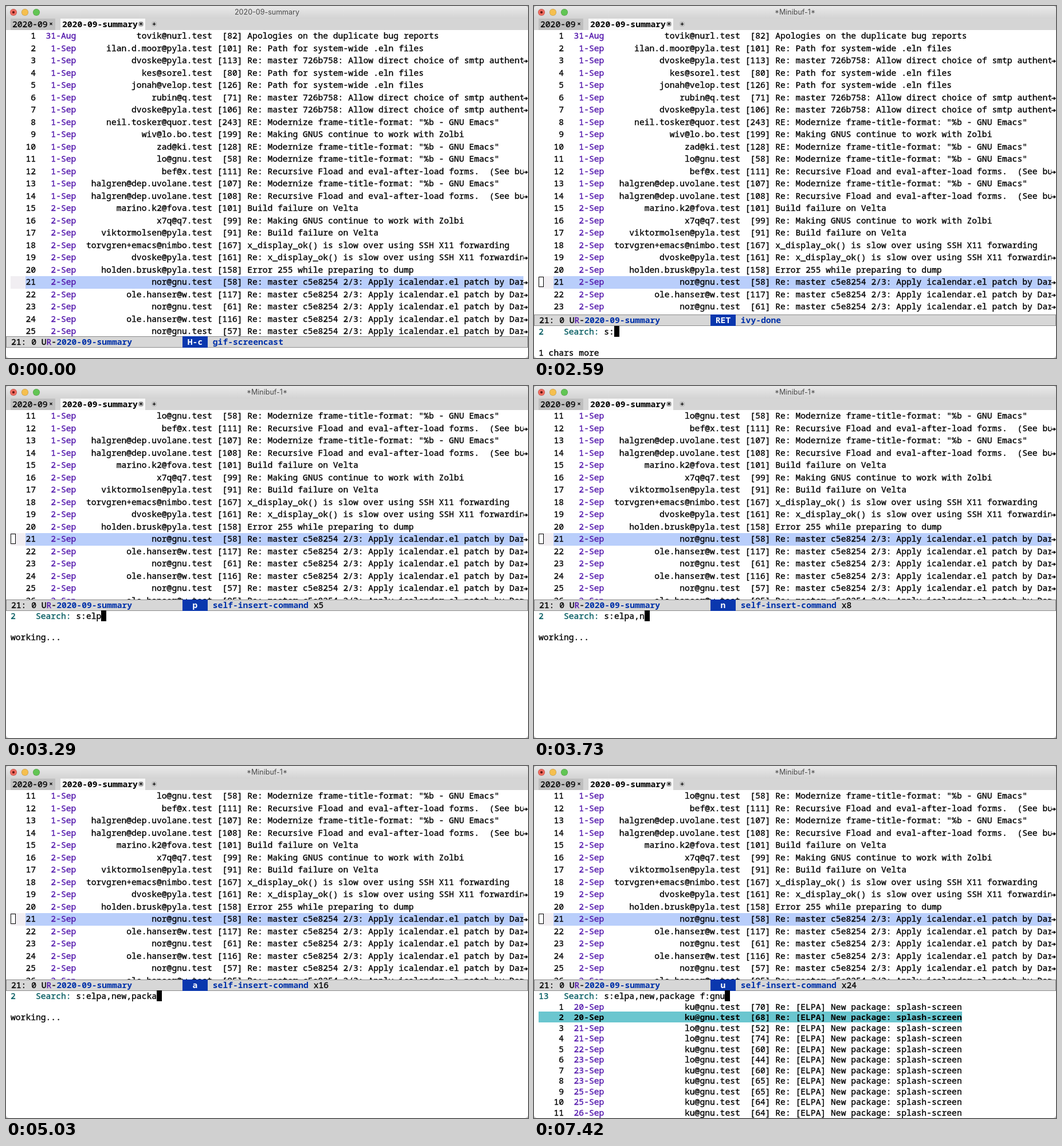
Recreate the animation shown at these times as an HTML page. Size 911 by 615 pixels, loop 8000 ms.

```html
<!DOCTYPE html>
<html lang="en">
<head>
<meta charset="utf-8">
<title>Mail search</title>
<style>
html, body { margin: 0; width: 100%; height: 100%; overflow: hidden; background: #bbb; }
#win { position: relative; width: 911px; height: 615px; overflow: hidden; background: #fff; border-radius: 5px;
  font: 500 14.667px "Noto Sans Mono", "DejaVu Sans Mono", monospace; color: #000; font-variant-ligatures: none;
  -webkit-text-stroke: .35px; }
#win div, #win svg { position: absolute; white-space: pre; box-sizing: border-box; }
#win b, #title, .icon, #win .pick { -webkit-text-stroke: 0; }
#win b { font-weight: 700; }
#bar { left: 0; top: 0; width: 911px; height: 22px; background: linear-gradient(#e9e9e9, #d3d3d3); }
#title { left: 0; top: 0; width: 911px; text-align: center; color: #4a4a4a; font: 400 12.5px/22px Inter, sans-serif; }
.light { top: 5px; width: 12px; height: 12px; border-radius: 50%; box-shadow: inset 0 0 0 .5px #0004; }
#tabs { left: 0; top: 22px; width: 911px; height: 20px; background: #d5d5d5; }
.tab { top: 0; height: 20px; padding-left: 3px; line-height: 19px; }
.icon { width: 9px; height: 9px; border-radius: 4px; font-size: 11px; line-height: 8px; text-align: center; font-weight: 700; }
#list { left: 0; top: 42px; width: 911px; overflow: hidden; }
.row { left: 8px; line-height: 19px; }
.mini { left: 8px; line-height: 18.5px; }
.fringe { left: 903px; width: 8px; height: 18px; background: #fff; }
.date { color: #5317ac; }
.pick { background: #6ac6cf; font-weight: 700; }
.pick .date { color: #000; }
#mode { left: 0; width: 911px; height: 20px; border: 1px solid #8c8c8c; background: #d7d7d7; padding-left: 8px; line-height: 17px; }
#mode b { color: #0031a9; }
#mode .key { position: relative; color: #fff; }
#keybox { left: 307.2px; top: -1px; width: 44px; height: 20px; background: #0a37ae; }
.prompt { color: #005a5f; }
.caret { display: inline-block; width: 9px; height: 18.5px; background: #000; vertical-align: top; }
</style>
</head>
<body>
<div id="win">
  <div id="bar">
    <div class="light" style="left:7px;background:#ed6a5f"></div>
    <div class="light" style="left:11px;top:9px;width:4px;height:4px;background:#6b1410"></div>
    <div class="light" style="left:27px;background:#f5bf4f"></div>
    <div class="light" style="left:47px;background:#62c554"></div>
    <div id="title"></div>
  </div>
  <div id="tabs">
    <div class="tab" style="left:8px;width:78px;background:#bfbfbf">2020-09</div>
    <div class="icon" style="left:74px;top:5px">×</div>
    <div class="tab" style="left:95px;width:148px;background:#f8f8f8"><b>2020-09-summary</b></div>
    <div class="icon" style="left:231px;top:5px;background:#b0b0b0">×</div>
    <div class="icon" style="left:254px;top:5px;background:#bdbdbd">+</div>
  </div>
  <div id="list"></div>
  <div id="mode"></div>
  <div id="mini"></div>
</div>
<script>
const PITCH = 21.5, MINI = 18.5, LOOP = 8000, WIDTH = 55;
const $ = id => document.getElementById(id);

const path = "Re: Path for system-wide .eln files";
const smtp = "Re: master 726b758: Allow direct choice of smtp authentication";
const frame = 'Modernize frame-title-format: "%b - GNU Emacs"';
const gnus = "Re: Making GNUS continue to work with Zolbi";
const fload = "Re: Recursive Fload and eval-after-load forms.  (See bug)";
const build = "Build failure on Velta";
const slow = "x_display_ok() is slow over using SSH X11 forwarding";
const patch = "Re: master c5e8254 2/3: Apply icalendar.el patch by Darvin";

const mails = [
  ["tovik@nurl.test", 82, "Apologies on the duplicate bug reports"],
  ["ilan.d.moor@pyla.test", 101, path],
  ["dvoske@pyla.test", 113, smtp],
  ["kes@sorel.test", 80, path],
  ["jonah@velop.test", 126, path],
  ["rubin@q.test", 71, smtp],
  ["dvoske@pyla.test", 106, smtp],
  ["neil.tosker@quor.test", 243, "RE: " + frame],
  ["wiv@lo.bo.test", 199, gnus],
  ["zad@ki.test", 128, "RE: " + frame],
  ["lo@gnu.test", 58, "Re: " + frame],
  ["bef@x.test", 111, fload],
  ["halgren@dep.uvolane.test", 107, "Re: " + frame],
  ["halgren@dep.uvolane.test", 108, fload],
  ["marino.k2@fova.test", 101, build],
  ["x7q@q7.test", 99, gnus],
  ["viktormolsen@pyla.test", 91, "Re: " + build],
  ["torvgren+emacs@nimbo.test", 167, slow],
  ["dvoske@pyla.test", 161, "Re: " + slow],
  ["holden.brusk@pyla.test", 158, "Error 255 while preparing to dump"],
  ["nor@gnu.test", 58, patch],
  ["ole.hanser@w.test", 117, patch],
  ["nor@gnu.test", 61, patch],
  ["ole.hanser@w.test", 116, patch],
  ["nor@gnu.test", 57, patch],
  ["ole.hanser@w.test", 95, patch]
].map((m, i) => [i < 1 ? "31-Aug" : i < 14 ? "1-Sep" : "2-Sep", ...m]);

const proposal = "[ELPA] New package proposal: org-translate";
const jens = [["16-Sep", 119, ""], ["19-Sep", 99, "Re: "], ["19-Sep", 100, "Re: "]]
  .map(([date, size, re]) => [date, "jens@jensholmqvard.test", size, re + proposal]);
const gnu = [[20, "ku", 70], [20, "ku", 68], [21, "lo", 52], [21, "lo", 74], [22, "ku", 60], [23, "lo", 44],
  [23, "ku", 60], [23, "ku", 65], [25, "ku", 65], [25, "ku", 64], [26, "ku", 64]]
  .map(([day, who, size]) => [day + "-Sep", who + "@gnu.test", size, "Re: [ELPA] New package: splash-screen"]);
const both = [...jens, ...gnu];
const early = ["7-Sep", "8-Sep"].map((date, i) =>
  [date, "nor@gnu.test", 64 + 9 * i, "Re: master 726b758: Allow direct choice of ELPA archives"]);

// Search results by number of typed characters: rows, total, selected row
const found = { 6: [[...early, ...both], 73, 0], 10: [both, 31, 0], 18: [both, 25, 0], 20: [jens, 3, 0], 24: [gnu, 13, 1] };
found[7] = found[6];
found[11] = found[10];
found[19] = found[18];

const query = "s:elpa,new,package f:gnu";
// Time and number of typed characters; -1 is before the search opens
const steps = [[0, -1], [1000, 0], [1730, 1], [2590, 2], [2980, 3], [3110, 4], [3290, 5], [3420, 6], [3570, 7],
  [3730, 8], [3860, 10], [4180, 11], [4460, 12], [4590, 13], [4710, 15], [5030, 16], [5260, 18], [5470, 19],
  [6100, 20], [6390, 21], [7150, 22], [7280, 23], [7420, 24]];

const line = (cls, y, html) => `<div class="${cls}" style="top:${y}px">${html}</div>`;
const box = (x, y, w, h, css) => `<div style="left:${x}px;top:${y}px;width:${w}px;height:${h}px;${css}"></div>`;
const arrow = `<svg width="8" height="18"><path d="M0 10.5H5" stroke="#000" stroke-width="1.4"/><path d="M4 7.5L8 10.5 4 13.5z"/></svg>`;

function mailRow(cls, y, [date, from, size, subject], number) {
  const text = `${String(number).padStart(5)}  <span class="date">${date.padStart(6)}</span>${from.padStart(27)} `
    + `${`[${size}]`.padStart(5)} ${subject.slice(0, WIDTH)}`;
  return line(cls, y, text) + (subject.length >= WIDTH ? line("fringe", y + 1, arrow) : "");
}

function drawList(first, height, open) {
  const y = (20 - first) * PITCH;
  let html = box(8, y, 26, 21.5, "background:#f1eef2") + box(34.4, y, 868.6, 21.5, "background:#b9cefb");
  if (open) html += box(8, y + 1, 9, 18, "border:1px solid #000;background:#fff");
  mails.slice(first).forEach((m, i) => html += mailRow("row", i * PITCH, m, first + i + 1));
  $("list").style.height = height + "px";
  $("list").innerHTML = html;
}

function drawMode(top, key, command, count) {
  const pad = key.padStart((5 + key.length) >> 1).padEnd(5);
  $("mode").style.top = top + "px";
  $("mode").innerHTML = `<div id="keybox"></div>21: 0 U<span class="date">R</span>-<b>2020-09-summary</b>${" ".repeat(10)}`
    + `<b class="key">${pad}</b> <b>${command}</b>${count ? " x" + count : ""}`;
}

function drawMini(top, n) {
  const [rows, total, pick] = found[n] || [[], 2, -1];
  const status = n < 3 ? 3 - n + " chars more" : "working...";
  let html = line("mini", top, `<span class="prompt">${String(total).padEnd(5)}Search: </span>`
    + `${query.slice(0, n)}<span class="caret"></span>`);
  if (!rows.length) html += line("mini", top + 2 * MINI, status);
  rows.slice(0, 11).forEach((m, i) =>
    html += mailRow(i == pick ? "mini pick" : "mini", top + (i + 1) * MINI, m, i + 1));
  $("mini").innerHTML = html;
}

function draw(n) {
  const open = n >= 0, typing = n > 2;
  const top = typing ? 373 : open ? 539 : 577;
  $("title").textContent = open ? "*Minibuf-1*" : "2020-09-summary";
  drawList(typing ? 10 : 0, top - 42, open);
  if (typing) drawMode(top, query[n - 1].replace(" ", "SPC"), "self-insert-command", n);
  else if (open) drawMode(top, "RET", "ivy-done");
  else drawMode(top, "H-c", "gif-screencast");
  if (open) drawMini(typing ? 392 : 559, n);
  else $("mini").innerHTML = "";
}

let shown;
const start = performance.now();
function tick() {
  const t = (performance.now() - start) % LOOP;
  const n = steps.filter(s => s[0] <= t).pop()[1];
  if (n !== shown) draw(shown = n);
  requestAnimationFrame(tick);
}
tick();
</script>
</body>
</html>
```
